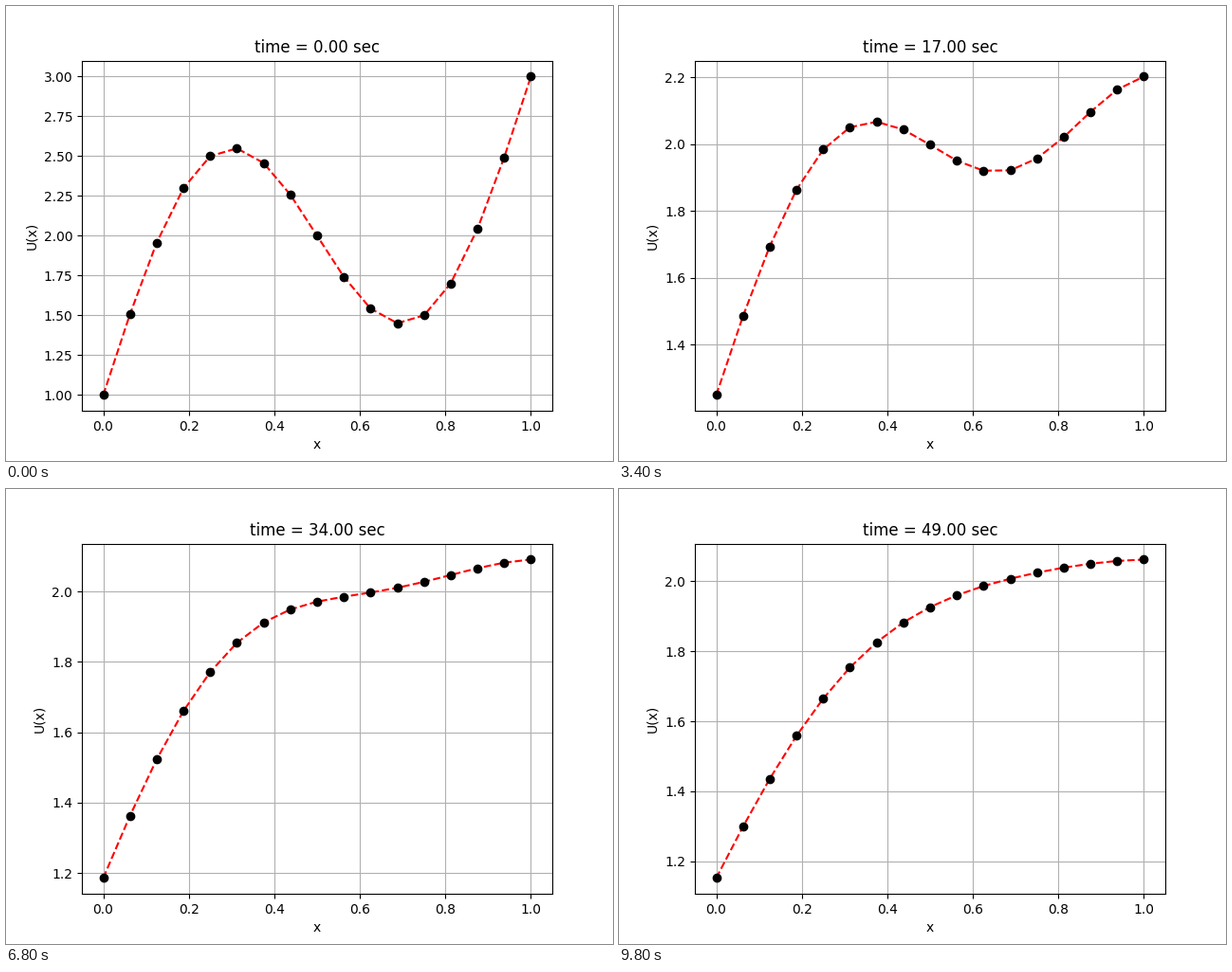
A matplotlib script for the animation above (10 s loop, 640 by 480 pixels).

```python
import numpy as np
import matplotlib.pyplot as plt
from matplotlib.animation import FuncAnimation

FRAMES = 50
INTERVAL = 200   # ms
DT = 1.0         # s per step
ALPHA = 0.00125  # diffusivity
N = 16

x = np.linspace(0, 1, N + 1)
dx = x[1] - x[0]


def step(u):
    """Explicit heat step: fixed value 1 outside the left end, no flux on the right."""
    padded = np.concatenate(([1.0], u, [u[-1]]))
    return u + ALPHA * DT / dx**2 * np.diff(padded, 2)


history = [1 + 2 * x + np.sin(2 * np.pi * x)]
for _ in range(FRAMES - 1):
    history.append(step(history[-1]))

fig, ax = plt.subplots(figsize=(6.4, 4.8), dpi=100)
line, = ax.plot(x, history[0], "r--")
dots, = ax.plot(x, history[0], "ko")
ax.set_xlabel("x")
ax.set_ylabel("U(x)")
ax.grid(True)
title = ax.set_title("")


def update(i):
    line.set_ydata(history[i])
    dots.set_ydata(history[i])
    ax.relim()
    ax.autoscale_view()
    title.set_text(f"time = {i * DT:.2f} sec")
    return line, dots, title


anim = FuncAnimation(fig, update, frames=FRAMES, interval=INTERVAL,
                     repeat=True, repeat_delay=0, blit=False)
plt.show()
```
